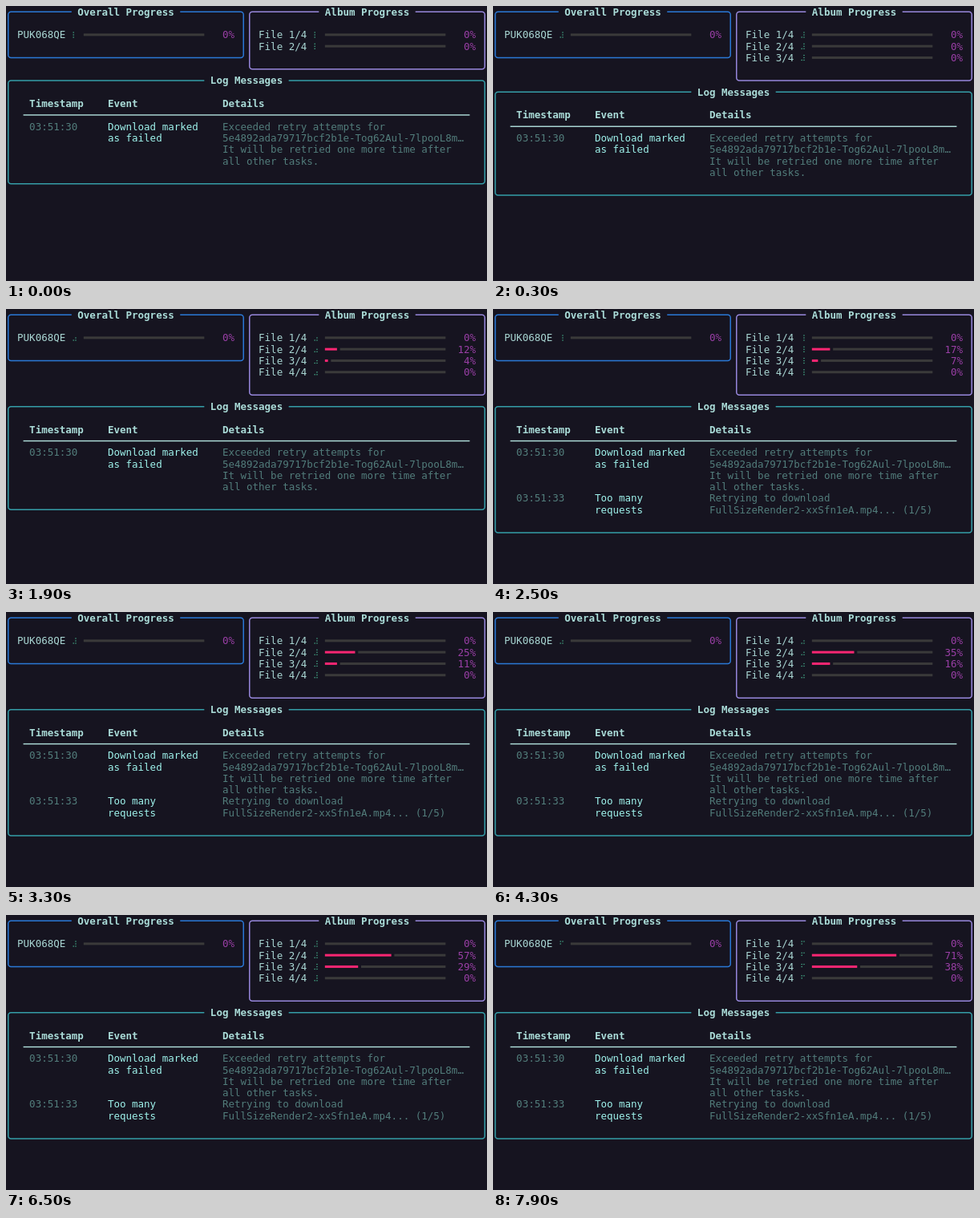
Animation, 600 px wide and 343 px high, one loop 8 s. Source, as an HTML page with a canvas:

```html
<!DOCTYPE html>
<html lang="en">
<head>
<meta charset="utf-8">
<title>Download progress</title>
<style>
  html, body { margin: 0; width: 100%; height: 100%; overflow: hidden; background: #161420; }
  canvas { display: block; width: 600px; height: 343px; }
</style>
</head>
<body>
<canvas id="stage"></canvas>
<script>
const canvas = document.getElementById('stage');
const ctx = canvas.getContext('2d');
const dpr = window.devicePixelRatio || 1;
canvas.width = 600 * dpr;
canvas.height = 343 * dpr;

const LOOP = 8000, TICK = 100;
const CELL_W = 7.525, CELL_H = 14.3;
const BAR_CELLS = 20;
const FONT = '12.5px "DejaVu Sans Mono", monospace';
const C = {
  bg: '#161420', text: '#a9d6d3', title: '#aadcd8', event: '#9ff3ec', dim: '#527d7b',
  percent: '#9a3fa6', spinner: '#45b08c', rest: '#3a3a3a', done: '#f92672',
  blue: '#2a78d6', violet: '#9787dc', teal: '#359ea8', rule: '#b2e2de'
};

// ticks without a screen refresh
const SKIPPED = new Set([6, 14, 18, 22, 34, 46, 54, 62, 66, 70]);

// braille spinner: dots 1-3 run down the left column, 4-6 down the right
const SPINNER = ['124', '145', '1456', '456', '3456', '356', '236', '1236', '123', '1234'];

const colX = col => col * CELL_W - 1;
const midX = col => colX(col + 0.5);
const midY = row => (row + 0.5) * CELL_H + 0.1;

function text(str, col, row, color, bold) {
  ctx.font = (bold ? 'bold ' : '') + FONT;
  ctx.fillStyle = color;
  const y = row * CELL_H + 11.6;
  [...str].forEach((ch, i) => { if (ch !== ' ') ctx.fillText(ch, colX(col + i), y); });
}

function lines(list, col, row, color) {
  list.forEach((str, i) => text(str, col, row + i, color));
}

function panel(title, titleCol, left, right, top, bottom, color) {
  const x = midX(left), y = midY(top);
  ctx.strokeStyle = color;
  ctx.lineWidth = 1.5;
  ctx.beginPath();
  ctx.roundRect(x, y, midX(right) - x, midY(bottom) - y, 3.5);
  ctx.stroke();
  ctx.fillStyle = C.bg;
  ctx.fillRect(colX(titleCol - 1), y - 3, (title.length + 2) * CELL_W, 6);
  text(title, titleCol, top, C.title, true);
}

function spinner(col, row, index) {
  ctx.fillStyle = C.spinner;
  for (const dot of SPINNER[index]) {
    const n = dot - 1;
    ctx.beginPath();
    ctx.arc(colX(col) + (n < 3 ? 2.4 : 5.2), midY(row) + (n % 3 - 1) * 3 + 0.1, 0.8, 0, 7);
    ctx.fill();
  }
}

function bar(col, row, percent) {
  const half = CELL_W / 2, x = colX(col), y = midY(row) - 1.5;
  const count = Math.floor(percent / 100 * BAR_CELLS * 2);
  const start = count ? count + 1 : 0;
  ctx.fillStyle = C.rest;
  ctx.fillRect(x + start * half, y, (BAR_CELLS * 2 - start) * half, 3);
  ctx.fillStyle = C.done;
  ctx.fillRect(x, y, count * half, 3);
}

function task(label, col, row, percent, spin) {
  const next = col + label.length + 1;
  text(label, col, row, C.text);
  spinner(next, row, spin);
  bar(next + 2, row, percent);
  text((Math.round(percent) + '%').padStart(4), next + 23, row, C.percent);
}

function log(top, retried) {
  const row = top + 4;
  panel('Log Messages', 34, 0, 79, top, row + (retried ? 7 : 5), C.teal);
  text('Timestamp', 4, top + 2, C.title, true);
  text('Event', 17, top + 2, C.title, true);
  text('Details', 36, top + 2, C.title, true);
  ctx.fillStyle = C.rule;
  ctx.fillRect(colX(3), midY(top + 3) - 0.7, 74 * CELL_W, 1.4);

  text('03:51:30', 4, row, C.dim);
  lines(['Download marked', 'as failed'], 17, row, C.event);
  lines([
    'Exceeded retry attempts for',
    '5e4892ada79717bcf2b1e-Tog62Aul-7lpooL8m…',
    'It will be retried one more time after',
    'all other tasks.'
  ], 36, row, C.dim);
  if (!retried) return;
  text('03:51:33', 4, row + 4, C.dim);
  lines(['Too many', 'requests'], 17, row + 4, C.event);
  lines(['Retrying to download', 'FullSizeRender2-xxSfn1eA.mp4... (1/5)'], 36, row + 4, C.dim);
}

function draw(ms) {
  let tick = Math.floor(ms / TICK);
  if (SKIPPED.has(tick)) tick--;
  const t = tick / 10;
  const mid = t + (SKIPPED.has(tick + 1) ? 0.1 : 0.05);
  const spin = Math.floor(8 + 12.5 * mid + 3.55 * Math.min(t / 0.6, 1)) % SPINNER.length;

  const files = tick < 2 ? 2 : tick < 4 ? 3 : 4;
  const second = Math.max(0, 9.3 * (t - 0.65), 10 * t - 7.8);
  const third = Math.max(0, 5 * (t - 1.1), 22 + 6.7 * (t - 5.5));
  const percents = [0, second, third, 0];

  ctx.setTransform(dpr, 0, 0, dpr, 0, 0);
  ctx.fillStyle = C.bg;
  ctx.fillRect(0, 0, 600, 343);

  panel('Overall Progress', 12, 0, 39, 0, 4, C.blue);
  task('PUK068QE', 2, 2, 0, spin);

  panel('Album Progress', 53, 40, 79, 0, files + 3, C.violet);
  for (let i = 0; i < files; i++) task(`File ${i + 1}/4`, 42, 2 + i, percents[i], spin);

  log(files + 4, tick >= 24);
}

const begin = performance.now();
function loop() {
  draw((performance.now() - begin) % LOOP);
  requestAnimationFrame(loop);
}
loop();
</script>
</body>
</html>
```
